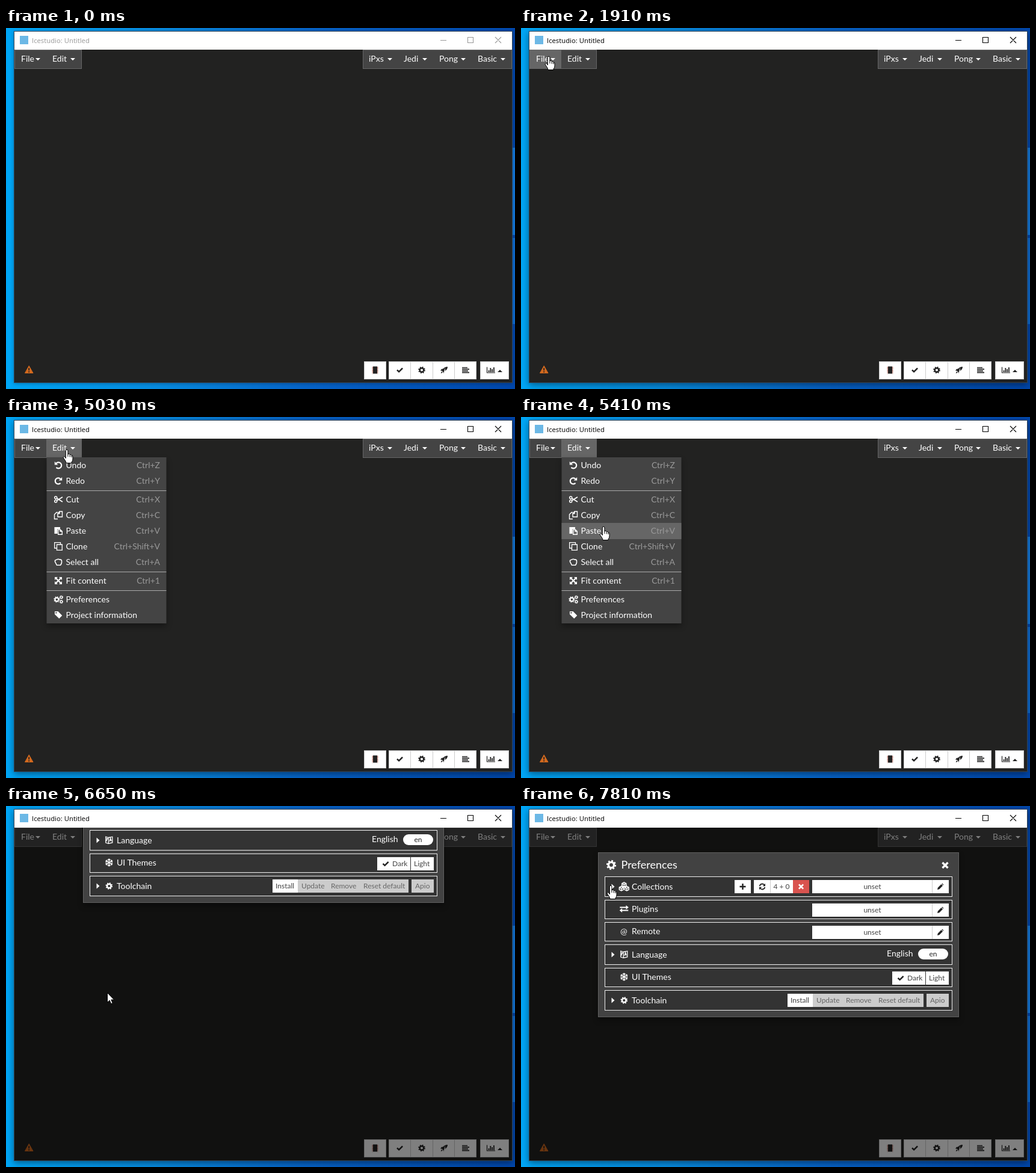
These frames come from a looping animation (846x600 px, 8000 ms). An HTML page:

```html
<!DOCTYPE html>
<html lang="en">
<head>
<meta charset="utf-8">
<title>Preferences walkthrough</title>
<style>
html, body { margin: 0; width: 100%; height: 100%; overflow: hidden; background: #0668cc }
svg { display: block }
text { font: 14px Lato, sans-serif; fill: #fff }
.small { font-size: 12px; fill: #444 }
.key { fill: #999; text-anchor: end }
.mid { text-anchor: middle }
.panel { filter: drop-shadow(0 5px 5px rgba(0,0,0,.35)) }
.title { font: 11.3px 'Open Sans', sans-serif; fill: currentColor }
</style>
</head>
<body>
<script>
const line = (d, w = 1.5) => `<path d="${d}" fill="none" stroke="currentColor" stroke-width="${w}"/>`;
const solid = d => `<path d="${d}" fill="currentColor"/>`;
const rect = (x, y, w, h, fill, more = '') =>
  `<rect x="${x}" y="${y}" width="${w}" height="${h}" fill="${fill}" ${more}/>`;
const text = (x, y, s, cls = '', more = '') => `<text x="${x}" y="${y}" class="${cls}" ${more}>${s}</text>`;
const ring = (x, y, r, w, dash = '') =>
  `<circle cx="${x}" cy="${y}" r="${r}" fill="none" stroke="currentColor" stroke-width="${w}" stroke-dasharray="${dash}"/>`;
const gear = (x, y, r) => ring(x, y, r * .58, r * .42) + ring(x, y, r * .85, r * .34, `${r * .334}`);
const cube = (x, y) => line(`M${x} ${y - 3.7}l3.4 1.7v3.9l-3.4 1.8l-3.4-1.8v-3.9zM${x - 3.4} ${y - 2}l3.4 1.8l3.4-1.8M${x} ${y - .2}v3.9`, 1.6);
const page = 'M-5-6.5H1L5-2.5V6.5H-5ZM1-6.5V-2.5H5';
const turn = line('M-3.5-3A5 5 0 1 1-3.5 3.7', 2.2) + solid('M-6.2-6V-.5H-.7Z');

// Every icon is drawn around 0,0
const icons = {
  file: line(page),
  folder: line('M-7 4V-5H-2.5L-1-3.5H4V-1.5M-7 4.5L-4-1.3H7.5L4.8 4.8H-6.8Z'),
  note: line('M-5.5-5.5H5.5V1.5L1.5 5.5H-5.5ZM5.5 1.5H1.5V5.5'),
  cubes: cube(0, -3.3) + cube(-4.5, 3.2) + cube(4.5, 3.2),
  swap: line('M-7-2.5H4M7 2.5H-4', 2) + solid('M3.2-6L7.6-2.5L3.2 1ZM-3.2-1L-7.6 2.5L-3.2 6Z'),
  floppy: line('M-5.5-5.5H3.5L5.5-3.5V5.5H-5.5ZM-3 5.5V1H3V5.5M-3-5.5V-2H2V-5.5'),
  disk: line('M-6 0L-3.8-4.5H3.8L6 0V4.5H-6ZM-6 .3H6M1 2.5H4.5'),
  zip: line(page) + line('M-1.5-6V1', 2) + ring(-1.3, 2.7, 1.4, 1.2),
  book: solid('M-3-6H7L3.8 5.8H-5.5Q-7.5 5-6.3 2.5Z') + '<path d="M-1.5-3.2H4M-2.2-.8H3.3M-5 3.9H3" stroke="#444"/>',
  heart: line('M0 5.5L-5.6 0C-8-3.5-3-8 0-3.5C3-8 8-3.5 5.6 0Z'),
  power: line('M-3-4.2A5.2 5.2 0 1 0 3-4.2M0-6.8V0', 2.1),
  undo: turn,
  redo: `<g transform="scale(-1 1)">${turn}</g>`,
  cut: ring(-4.3, -3, 2, 1.5) + ring(-4.3, 3, 2, 1.5) + line('M-2.7-2L7 4M-2.7 2L7-4', 1.7),
  copy: line('M-1-2.5L2-6H6.5V3H-1ZM-1-2.5H2V-6M-1 6.5H-6.5V-1L-3-4.5H-1', 1.4),
  paste: solid('M-6.5-6H3V-3H-1.5V5H-6.5Z') + line('M-.3-2H3L6.3 1V6.3H-.3ZM3-2V1H6.3', 1.4),
  clone: line('M-2.5-3H6.3V6.3H-2.5ZM-3 3H-6.3V-6.3H3.5V-3.5', 1.3),
  hand: line('M-5.5-.5V-2.5Q-3.5-4-2.5-4Q0-5.5 2-4Q5-4.5 5.5-2V1Q5 3.5 3.5 5.3H-2.5Z', 1.6),
  expand: line('M-4.5-4.5L4.5 4.5M4.5-4.5L-4.5 4.5', 2.2) + solid('M-6-6H-1L-6-1ZM6-6V-1L1-6ZM-6 6V1L-1 6ZM6 6H1L6 1Z'),
  cogs: gear(-2.6, .3, 5) + gear(4.9, -3.4, 3.1) + gear(4.9, 4, 3.1),
  tag: solid('M-6-6H-.5L6.3 1L1.3 6L-6-1ZM-3.7-4.8a1.2 1.2 0 1 0 .1 0Z'),
  chip: solid('M-3.5-6H3.5V6H-3.5Z') + '<path d="M-4.2-5V6M4.2-5V6" stroke="#a43" stroke-width="1.6" stroke-dasharray="1.2 1.4"/>',
  check: line('M-4.5-.2L-1.4 2.8L4.6-3.2', 2.5),
  gear: gear(0, 0, 5.7),
  rocket: solid('M6-5.5Q1-5.5-1.5-2L-4-1.8L-6 1L-3.5 1.2L-1 3.7L-.8 6L2-4.0L2 3.8L2.2 1.2Q6-1.5 6-5.5ZM-4 2.3L-2 4.3L-5.3 5.5Z'),
  align: line('M-6-4H3M-6-1.3H6M-6 1.4H4M-6 4.1H6', 1.7),
  chart: line('M-6.5-5V4.5H7', 1.2) + line('M-3.5 3.5V.5M-.7 3.5V-3.5M2.1 3.5V-1.5M4.9 3.5V-4.5', 1.8),
  times: line('M-4.5-4.5L4.5 4.5M4.5-4.5L-4.5 4.5', 3.4),
  plus: line('M-5 0H5M0-5V5', 2.4),
  refresh: line('M-4.3-.8A4.4 4.4 0 0 1 3.3-3M4.3.8A4.4 4.4 0 0 1-3.3 3', 1.8) + solid('M5-5.2V-.8H.7ZM-5 5.2V.8H-.7Z'),
  pencil: solid('M-5 5L-4.2 1.7L1.5-4L4 -1.5L-1.7 4.2ZM2.2-4.7L3.2-5.4L5.4-3.2L4.7-2.2Z'),
  language: line('M-1-4.5L5.5-5.8V4L-1 5.5ZM-1-4.5L-5.5-5.8V4L-1 5.5M.8 2L2.3-3.5L4 1.5M1 0H3.7M-4.5-2.5H-2M-3.3-4V-2.5L-4.5 1.5', 1.3),
  snow: [0, 60, 120].map(a => `<g transform="rotate(${a})">${line('M0-6.6V6.6M-2-5.5L0-3.6L2-5.5M-2 5.5L0 3.6L2 5.5', 1.5)}</g>`).join('')
};
const icon = (name, x, y, color = '#fff', scale = 1) =>
  `<g transform="translate(${x} ${y}) scale(${scale})" color="${color}">${icons[name]}</g>`;
const caret = (x, y = 50) => `<path d="M${x} ${y}h8l-4 4z" fill="#fff"/>`;
const right = (x, y) => `<path d="M${x} ${y - 4.5}v9l5-4.5z" fill="#fff"/>`;

// Items are "icon|label|shortcut"; a shortcut of ">" is a submenu, '' a divider
function menu(id, x, w, items) {
  let y = 67, rows = '', centers = [];
  for (const item of items) {
    if (!item) {
      rows += rect(x, y + 3, w, 1, '#aaa');
      y += 5;
      continue;
    }
    const [name, label, key] = item.split('|'), c = y + 13;
    rows += icon(name, x + 19.5, c) + text(x + 32, c + 5, label);
    if (key) rows += key == '>' ? right(x + w - 15, c + 1) : text(x + w - 10.5, c + 5, key, 'key');
    centers.push(c);
    y += 26;
  }
  const body = rect(x, 67, w, y - 66, '#444', 'class="panel"') + rect(x, 0, w, 27, '#666', `id="${id}Row"`);
  return { html: `<g id="${id}">${body}${rows}</g>`, centers };
}
const fileMenu = menu('fileMenu', 15.5, 229, [
  'file|New|Ctrl+N', 'folder|Open...|Ctrl+O', 'note|Add as block...', 'cubes|Collections|>', 'swap|Plugins|>', '',
  'floppy|Save|Ctrl+S', 'disk|Save as...|Ctrl+Shift+S', 'zip|Export...|>', '',
  'book|Documentation', 'heart|About', '', 'power|Quit|Ctrl+Q']);
const editMenu = menu('editMenu', 67.5, 199, [
  'undo|Undo|Ctrl+Z', 'redo|Redo|Ctrl+Y', '',
  'cut|Cut|Ctrl+X', 'copy|Copy|Ctrl+C', 'paste|Paste|Ctrl+V', 'clone|Clone|Ctrl+Shift+V', 'hand|Select all|Ctrl+A', '',
  'expand|Fit content|Ctrl+1', '', 'cogs|Preferences', 'tag|Project information']);

const bar = (x, w) => rect(x + .5, 36.5, w - 1, 31, '#444', 'stroke="#666"');
const tops = [['File', 25, 49], ['Edit', 77, 107], ['iPxs', 603, 634], ['Jedi', 661, 692], ['Pong', 720, 756], ['Basic', 784, 822]];
const menuBar = bar(14, 112) + bar(593, 248) +
  rect(14, 37, 53, 31, '#666', 'id="fileHot"') + rect(67, 37, 59, 31, '#666', 'id="editHot"') +
  tops.map(([s, x, c]) => text(x, 56, s) + caret(c)).join('');

const button = (x, w) => rect(x + .5, 554.5, w - 1, 29, '#fff', 'stroke="#ccc"');
const toolbar = button(595, 37) + button(636, 146) + button(788, 48) +
  [672, 709, 745].map(x => rect(x, 555, 1, 29, '#ccc')).join('') +
  [['chip', 613.5], ['check', 654.5], ['gear', 691], ['rocket', 728], ['align', 764], ['chart', 806]]
    .map(([n, x]) => icon(n, x, 568.5, '#222')).join('') +
  '<path d="M817 572h8l-4-4z" fill="#222"/>' +
  '<path d="M38.2 561.5L45 573.5H31.5Z" fill="#d2691e" stroke="#d2691e" stroke-linejoin="round"/>' +
  '<path d="M38.2 565v4.2M38.2 570.5v2" stroke="#222" stroke-width="1.8"/>';

const entry = (y, s, style = '') => rect(484, y, 227, 22, '#fff') + rect(683, y, 1, 22, '#ccc') +
  text(584, y + 15, s, 'small mid', style) + icon('pencil', 697, y + 11, '#222');
const chip = (x, w, y, s, tx, fill = '#fff') => rect(x, y, w, 22, fill) +
  text(tx, y + 15, s, 'small', fill == '#fff' ? '' : 'style="fill:#666"');
const section = (y, h, c, name, label, opens) => rect(139.5, y + .5, 577, h, '#333', 'stroke="#eee"') +
  (opens ? right(150.5, c) : '') + (name ? icon(name, 171.3, c) : text(165, c + 4.5, '@', '', 'font-weight="700"')) +
  text(184, c + 5, label);
const dialog = rect(128.5, 77.5, 599, 273, '#424242', 'stroke="#606060" class="panel"') +
  icon('gear', 150, 98, '#fff', 1.4) + text(166.5, 104, 'Preferences', '', 'style="font-size:18px"') + icon('times', 705, 98.5) +
  section(117, 33, 134, 'cubes', 'Collections', 1) + section(156, 31, 171, 'swap', 'Plugins') +
  section(193, 31, 208, '', 'Remote') + section(230, 33, 247, 'language', 'Language', 1) +
  section(269, 31, 284, 'snow', 'UI Themes') + section(306, 33, 323, 'gear', 'Toolchain', 1) +
  rect(355, 123, 27, 22, '#fff') + icon('plus', 368.5, 134, '#222') +
  rect(387, 123, 65, 22, '#fff') + rect(414, 123, 1, 22, '#ccc') + icon('refresh', 401, 134, '#222') +
  text(433, 138, '4 + 0', 'small mid') + rect(452, 123, 27, 22, '#d9534f') + icon('times', 465.5, 134, '#fff', .8) +
  entry(123, 'unset') + entry(162, 'unset', 'font-style="italic"') + entry(199, 'unset', 'font-style="italic"') +
  text(608, 250, 'English') + rect(660, 237, 50, 18, '#fff', 'rx="9"') + text(685, 250, 'en', 'small mid', 'style="fill:#222"') +
  chip(617, 55, 275, 'Dark', 642) + icon('check', 631, 286, '#222') + chip(673, 38, 275, 'Light', 678) +
  chip(443, 42, 312, 'Install', 448) + rect(485, 312, 184, 22, '#ccc') + chip(485, 50, 312, 'Update', 491, '#ccc') +
  chip(535, 53, 312, 'Remove', 540, '#ccc') + chip(588, 81, 312, 'Reset default', 594, '#ccc') + chip(674, 37, 312, 'Apio', 680, '#ccc');

const cursors = {
  arrow: '<path d="M.5.5V16.5L4.2 13L6.7 18.7L9.2 17.6L6.8 12H11.6Z" fill="#fff" stroke="#000"/>',
  hand: '<path d="M-1.7 14.5V2a1.8 1.8 0 0 1 3.6 0V7.5Q4.8 6.6 5.2 8.6Q7.6 7.8 8 9.8Q10 9.6 10 12V16Q10 19 8 21V22.5H-1.2V21Q-2.6 18-5.2 14.5Q-6.4 12.2-4.8 11.6Q-3.4 11.5-1.7 14.5Z" fill="#fff" stroke="#000"/>' +
    '<path d="M1.9 7V12M5.2 8.5V12.5M8 9.7V13" stroke="#000" fill="none"/>',
  busy: '<circle r="9.5" fill="none" stroke="#2c9fe0" stroke-width="4"/><path d="M0-9.5A9.5 9.5 0 0 1 9.5 0" fill="none" stroke="#a8e4ff" stroke-width="4"/>'
};

document.body.innerHTML = `<svg width="846" height="600" viewBox="0 0 846 600">
<defs><linearGradient id="sky">
  <stop stop-color="#00a6f6"/><stop offset=".3" stop-color="#078be0"/><stop offset=".6" stop-color="#0663c8"/><stop offset="1" stop-color="#0047ac"/>
</linearGradient></defs>
${rect(0, 0, 846, 600, 'url(#sky)')}
${rect(841, 199, 5, 145, '#1479dc')}${rect(841, 349, 5, 143, '#0f6cd0')}
${rect(13.5, 5.5, 828, 584, '#222221', 'id="frame" stroke="#345"')}
<g id="caption">${rect(14, 6, 827, 30, '#fff')}${rect(23, 13, 14, 14, '#6cb8e6')}
${text(43, 25, 'Icestudio: Untitled', 'title')}${line('M722 20.5H732M767.5 15.5H776.5V24.5H767.5ZM813 15L823 25M823 15L813 25', 1.1)}</g>
<svg x="14" y="36" width="827" height="553" viewBox="14 36 827 553">
${menuBar}${toolbar}${fileMenu.html}${editMenu.html}
<g id="modal">${rect(14, 36, 827, 553, '#000', 'opacity=".5"')}<g id="dialog">${dialog}</g></g>
</svg>
${Object.keys(cursors).map(k => `<g id="${k}">${cursors[k]}</g>`).join('')}
</svg>`;

const el = id => document.getElementById(id);
const show = (id, on) => el(id).style.display = on ? '' : 'none';
const mix = (a, b, u) => a + (b - a) * u;
const ease = u => (u + u * u * (3 - 2 * u)) / 2;
// Index of the current step among n steps from start to end
const step = (t, start, end, n) =>
  Math.max(-1, Math.min(n - 1, Math.floor((t - start) / (end - start) * (n - 1) + .1)));
const part = (t, start, end, n) => Math.max(0, step(t, start, end, n)) / (n - 1);

function pointer(t) {
  if (t < 450) return null;
  if (t < 1300) {
    const u = ease(part(t, 450, 1220, 11));
    return ['arrow', mix(602, 73, u), mix(557, 68, u)];
  }
  if (t < 3470) {
    const u = part(t, 1300, 1450, 3);
    return ['hand', mix(60, 46, u), mix(56, 46.5, u)];
  }
  if (t < 3810) return ['hand', mix(56, 90, part(t, 3470, 3620, 3)), 47];
  if (t < 5030) return ['hand', 97, 48];
  if (t < 5870) {
    const u = ease(part(t, 5030, 5800, 11));
    return ['hand', mix(101, 168, Math.min(1, u * 1.07)), mix(54, 310, u)];
  }
  if (t < 5950) return ['arrow', 168, 310];
  if (t < 6100 || t >= 6270 && t < 6650) return null;
  if (t < 6270) return ['busy', 168, 310];
  const u = ease(part(t, 7190, 7810, 9)), v = 1 - u;
  const at = (a, b, c) => a * v * v + 2 * b * u * v + c * u * u;
  return [u == 1 ? 'hand' : 'arrow', at(168, 270, 149), at(310, 205, 132)];
}

function draw(t) {
  const active = t >= 1760, p = pointer(t);
  el('caption').style.color = active ? '#000' : '#999';
  el('frame').style.filter = `drop-shadow(0 ${active ? 3 : 1}px ${active ? 6 : 3}px rgba(0,0,0,${active ? .45 : .3}))`;
  el('fileHot').style.opacity = t < 4320 ? (step(t, 1760, 1910, 3) + 1) / 3 : 0;
  el('editHot').style.opacity = t < 6650 ? (step(t, 4090, 4170, 2) + 1) / 2 : 0;
  show('fileMenu', t >= 2140 && t < 4320);
  show('editMenu', t >= 4320 && t < 6650);
  show('fileMenuRow', false);

  const y = t >= 5800 ? 310 : p ? p[2] : 0;
  const row = editMenu.centers.find(c => y >= 67 && Math.abs(y - c) <= 13);
  show('editMenuRow', row);
  if (row) el('editMenuRow').setAttribute('y', row - 13);

  show('modal', t >= 6650);
  const drop = [-190, -78, -14, -2, 0][Math.max(0, step(t, 6650, 6960, 5))];
  el('dialog').setAttribute('transform', `translate(0 ${drop})`);

  for (const k in cursors) show(k, p && p[0] == k);
  if (p) el(p[0]).setAttribute('transform', `translate(${Math.round(p[1])} ${Math.round(p[2])})`);
}

const begin = performance.now();
(function tick() {
  draw((performance.now() - begin) % 8000);
  requestAnimationFrame(tick);
})();
</script>
</body>
</html>
```
